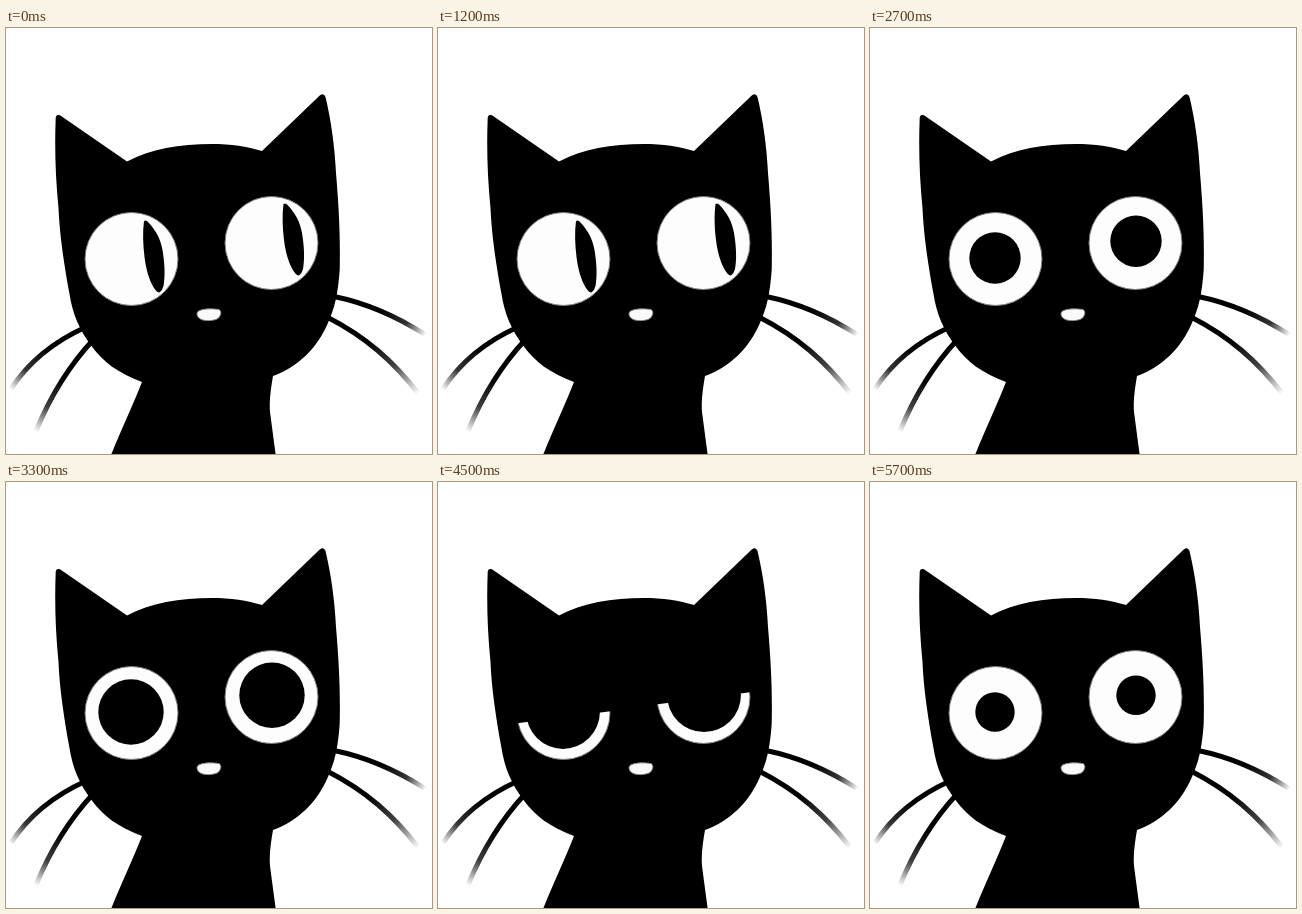
An HTML page for the animation above (6000 ms loop, 426 by 426 pixels).

```html
<!DOCTYPE html>
<html lang="en">
<head>
<meta charset="utf-8">
<title>Cat</title>
<style>
  html, body { margin: 0; width: 100%; height: 100%; overflow: hidden; background: #fff; }
  svg { display: block; width: 100%; height: 100%; }
</style>
</head>
<body>
<svg viewBox="0 0 426 426" xmlns="http://www.w3.org/2000/svg">
  <defs>
    <linearGradient id="fadeL" gradientUnits="userSpaceOnUse" x1="42" y1="320" x2="4" y2="362">
      <stop offset="0"/><stop offset=".55" stop-opacity=".8"/><stop offset="1" stop-opacity="0"/>
    </linearGradient>
    <linearGradient id="fadeL2" gradientUnits="userSpaceOnUse" x1="56" y1="350" x2="30" y2="404">
      <stop offset="0"/><stop offset=".55" stop-opacity=".75"/><stop offset="1" stop-opacity="0"/>
    </linearGradient>
    <linearGradient id="fadeR" gradientUnits="userSpaceOnUse" x1="376" y1="282" x2="420" y2="307">
      <stop offset="0"/><stop offset=".55" stop-opacity=".8"/><stop offset="1" stop-opacity="0"/>
    </linearGradient>
    <linearGradient id="fadeR2" gradientUnits="userSpaceOnUse" x1="362" y1="312" x2="413" y2="365">
      <stop offset="0"/><stop offset=".5" stop-opacity=".75"/><stop offset="1" stop-opacity="0"/>
    </linearGradient>
    <clipPath id="sockets">
      <circle cx="125.5" cy="231" r="48"/>
      <circle cx="265.5" cy="215" r="48"/>
    </clipPath>
    <path id="slit" d="M138 193 Q140 191.5 142 194 C150.500 203 154.500 211 156.500 222 C158.500 234 159.500 247 157.500 258 Q156.500 262.500 153.500 264.500 Q151 264.500 148 260 C143 252 140 241 138.500 229 C137 217 136.500 204 138 193Z"/>
  </defs>

  <g fill="none" stroke-width="5">
    <path d="M80 299 C49 313 23 333 5 361" stroke="url(#fadeL)"/>
    <path d="M87 312 C62 339 44 369 30 403" stroke="url(#fadeL2)"/>
    <path d="M328 268.500 C360 275 390 288 419 306.500" stroke="url(#fadeR)"/>
    <path d="M321 289 C360 309 387 333 412 365" stroke="url(#fadeR2)"/>
  </g>

  <path d="M49.700 90 Q50 86 54 87.300 L121 133.500 C144 121 174 116 206 116 C225 116 241 118.500 256 123 L314 67.300 Q318 64.500 319.500 69
    C325 92 328.500 117 330 145 C332.500 175 334.500 205 333.700 242 C332 266 328.500 281 321.500 296 C311 320 292 339 267 348
    C265 360 263 372 264 384 L269.700 427 H105 C116 400 127 377 136 354
    C112 345 97 334 85.500 318 C73.500 302 66.500 286 63.500 266 C58.500 239 53.500 207 52.500 180 C49.500 150 48.500 120 49.700 90Z"/>

  <path d="M193 282.800 C198 280.500 206 280.500 213 281.500 C216 283.500 215 287.500 212 290.500 C207 293.300 198 293.300 194 290.800 C190.500 288.300 190 284.300 193 282.800Z" fill="#fcf9f9" stroke="#888" stroke-width=".9"/>

  <g fill="#fdfdfd" stroke="#777" stroke-width="1">
    <circle cx="125.5" cy="231" r="46.500"/>
    <circle cx="265.5" cy="215" r="46.500"/>
  </g>

  <g id="slits">
    <use href="#slit"/>
    <use href="#slit" x="139.500" y="-17"/>
  </g>
  <g id="pupils">
    <circle cx="125" cy="230"/>
    <circle cx="266" cy="213.200"/>
  </g>
  <g clip-path="url(#sockets)">
    <g id="lids">
      <path d="M70 150 H182 V228 L70 242.500Z"/>
      <path d="M210 130 H322 V209 L210 223.500Z"/>
    </g>
  </g>
</svg>
<script>
const STEP = 300, LOOP = 6000;
const GLANCES = 8;                        // looks to the right and left in turn
const WIDE = 36.9, LID_DROP = 8.5;
const RADII = [19.7, 25.7, 25.7, 32.7];   // pupils widen, then narrow again
const MIDDLE = 14;                        // lids are lowest here

const el = id => document.getElementById(id);
const slits = el('slits'), pupils = el('pupils'), lids = el('lids');
const show = (node, on) => node.setAttribute('visibility', on ? 'visible' : 'hidden');
const shift = (node, x, y) => node.setAttribute('transform', `translate(${x} ${y})`);

function pupilRadius(step) {
  if (step < MIDDLE) return RADII[step - GLANCES] ?? WIDE;
  return [32.7, 25.7, 19.7][step - 17] ?? WIDE;
}

function draw(time) {
  const step = Math.floor((time % LOOP) / STEP);
  const glancing = step < GLANCES;

  show(slits, glancing);
  show(pupils, !glancing);
  show(lids, Math.abs(step - MIDDLE) <= 1);

  if (glancing) {
    const left = step % 2;
    shift(slits, -42.6 * left, 6 * left);
  } else {
    for (const p of pupils.children) p.setAttribute('r', pupilRadius(step));
  }
  shift(lids, 0, step === MIDDLE ? LID_DROP : 0);
}

let start;
function tick(now) {
  start ??= now;
  draw(now - start);
  requestAnimationFrame(tick);
}
draw(0);
requestAnimationFrame(tick);
</script>
</body>
</html>
```
